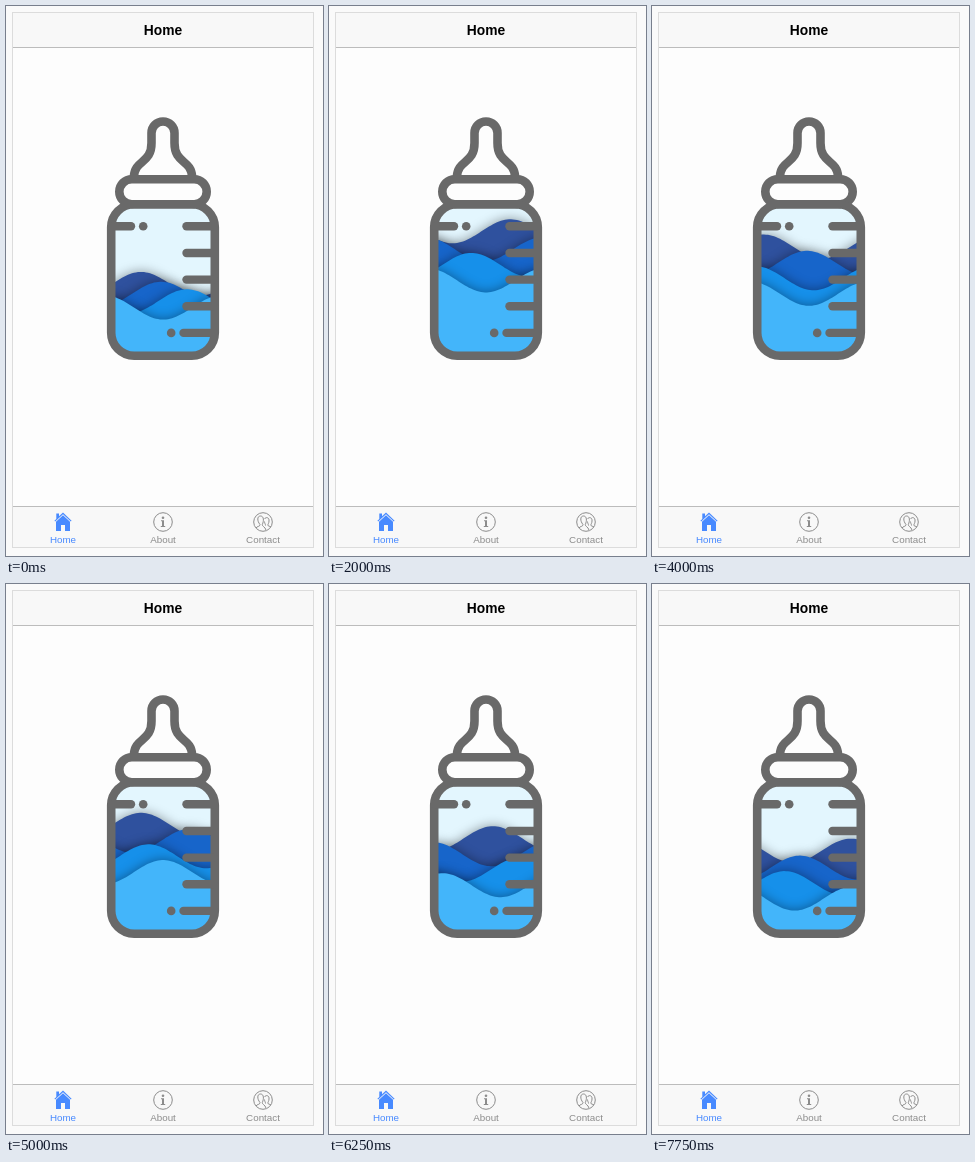
These frames come from a looping animation (317 by 550 pixels, 8 s). An HTML page with a canvas:

```html
<!DOCTYPE html>
<html lang="en">
<head>
<meta charset="utf-8">
<title>Bottle</title>
<style>
  html, body { margin: 0; width: 100%; height: 100%; overflow: hidden; background: #fafafa; }
  canvas { display: block; width: 317px; height: 550px; }
</style>
</head>
<body>
<canvas id="stage" width="317" height="550"></canvas>
<script>
const ctx = document.getElementById('stage').getContext('2d');
const LOOP = 8;
const WAVELENGTH = 116;
const AMPLITUDE = 12;
const GREY = '#696969';
const ACTIVE = '#488aff';
const IDLE = '#8c8c8c';

// Back to front; crest is the crest position at time zero, period is in seconds.
const waves = [
  { color: '#2f519e', crest: 135, period: 5, lift: 47, delay: 0.4 },
  { color: '#1765ca', crest: 155, period: 4, lift: 31, delay: 0.26 },
  { color: '#1690ea', crest: 181, period: 3, lift: 15.5, delay: 0.13 },
  { color: '#43b5fa', crest: 215, period: 2, lift: 0, delay: 0 }
];

function ease(p) {
  p = Math.max(0, Math.min(1, p));
  return p * p * (3 - 2 * p);
}

// One refill, followed by four sips.
function levelAt(t) {
  let level = 328 - 67 * ease((t + 0.57) / 1.33);
  for (let sip = 0; sip < 4; sip++) {
    level += 13.4 * ease((t - 1.15 - 1.9 * sip) / 0.6);
  }
  return level;
}

function stroke(path, color, width) {
  ctx.strokeStyle = color;
  ctx.lineWidth = width;
  ctx.stroke(new Path2D(path));
}

function fill(path, color) {
  ctx.fillStyle = color;
  ctx.fill(new Path2D(path));
}

function dot(x, y, r, color) {
  ctx.fillStyle = color;
  ctx.beginPath();
  ctx.arc(x, y, r, 0, Math.PI * 2);
  ctx.fill();
}

function ring(x, y, r, color) {
  ctx.strokeStyle = color;
  ctx.lineWidth = 1;
  ctx.beginPath();
  ctx.arc(x, y, r, 0, Math.PI * 2);
  ctx.stroke();
}

function label(text, x, y, font, color) {
  ctx.font = font + ' "Liberation Sans", Arial, sans-serif';
  ctx.textAlign = 'center';
  ctx.fillStyle = color;
  ctx.fillText(text, x, y);
}

function rect(x, y, w, h, color) {
  ctx.fillStyle = color;
  ctx.fillRect(x, y, w, h);
}

function roundRect(x, y, w, h, r) {
  const path = new Path2D();
  path.roundRect(x, y, w, h, r);
  return path;
}

function drawScreen() {
  rect(0, 0, 317, 550, '#fafafa');
  rect(6, 6, 302, 536, '#dcdcdc');
  rect(7, 7, 300, 534, '#fdfdfd');
  rect(7, 7, 300, 34, '#f8f8f8');
  rect(7, 41, 300, 1, '#bcbcbc');
  rect(7, 500, 300, 1, '#bcbcbc');
  rect(7, 501, 300, 40, '#f8f8f8');
  label('Home', 157, 29, 'bold 13.8px', '#000');

  label('Home', 57, 537, '9.8px', ACTIVE);
  label('About', 157, 537, '9.8px', IDLE);
  label('Contact', 257, 537, '9.8px', IDLE);

  fill('M57 509.2 L64 515.8 V525 H59 V519 H55 V525 H50 V515.8Z', ACTIVE);
  fill('M57 506.5 L65.6 514.7 L64.8 515.6 L57 508.2 L49.2 515.6 L48.4 514.7 ' +
       'L50.3 512.9 V507.5 H53 V510.3Z', ACTIVE);

  ring(157, 516, 9.3, IDLE);
  dot(157, 511.8, 1.3, IDLE);
  fill('M155 514.3 H158 V520 H159.2 V521 H154.8 V520 H156 V515.3 H155Z', IDLE);

  ring(257, 516, 9.3, IDLE);
  stroke('M250 522 C251 520 254 521 254 518.5 C251 515 251 510 254.5 510 ' +
         'C258 510 258 515 256.3 518.5 C256 520.5 259 520.5 260 524 ' +
         'M258.5 513 C260 510.5 263.5 511.5 263 515 C263 517 262 518 261.8 519 ' +
         'C262 520.5 264 520 265 521 M258.5 515.5 C258.5 517.5 259.6 518 259.5 519.5', IDLE, 1);
}

function drawWave(wave, t) {
  const mid = levelAt(t - wave.delay) - wave.lift;
  const crest = wave.crest + WAVELENGTH * t / wave.period;
  ctx.beginPath();
  ctx.moveTo(80, 380);
  for (let x = 80; x <= 234; x += 2) {
    ctx.lineTo(x, mid - AMPLITUDE * Math.cos((x - crest) * 2 * Math.PI / WAVELENGTH));
  }
  ctx.lineTo(234, 380);
  ctx.closePath();
  ctx.fillStyle = wave.color;
  ctx.fill();
}

function drawBottle(t) {
  const body = roundRect(105.2, 198.2, 103.6, 151.6, 23);
  ctx.save();
  ctx.clip(body);
  rect(100, 190, 120, 170, '#e3f6fe');
  ctx.shadowColor = 'rgba(0, 0, 0, 0.4)';
  ctx.shadowBlur = 12;
  waves.forEach(wave => drawWave(wave, t));
  ctx.restore();

  ctx.lineCap = 'round';
  stroke('M127.8 171 C129 153 145.5 158 145.5 137 V127 A11.5 11.5 0 0 1 168.5 127 ' +
         'V137 C168.5 158 185 153 186.2 171', GREY, 8.6);

  const collar = roundRect(113.3, 173.2, 87.4, 25, 12.5);
  ctx.fillStyle = '#fdfdfd';
  ctx.fill(collar);
  ctx.stroke(collar);
  ctx.stroke(body);

  for (let i = 0; i < 5; i++) {
    const y = 220.3 + 26.65 * i;
    stroke(`M${i === 4 ? 177.5 : 180.5} ${y} H208`, GREY, 8.4);
  }
  stroke('M106 220.3 H125', GREY, 8.4);
  dot(137.2, 220.3, 4.3, GREY);
  dot(165.2, 326.9, 4.3, GREY);
  ctx.lineCap = 'butt';
}

function render(now) {
  drawScreen();
  drawBottle(now / 1000 % LOOP);
  requestAnimationFrame(render);
}
render(0);
</script>
</body>
</html>
```
